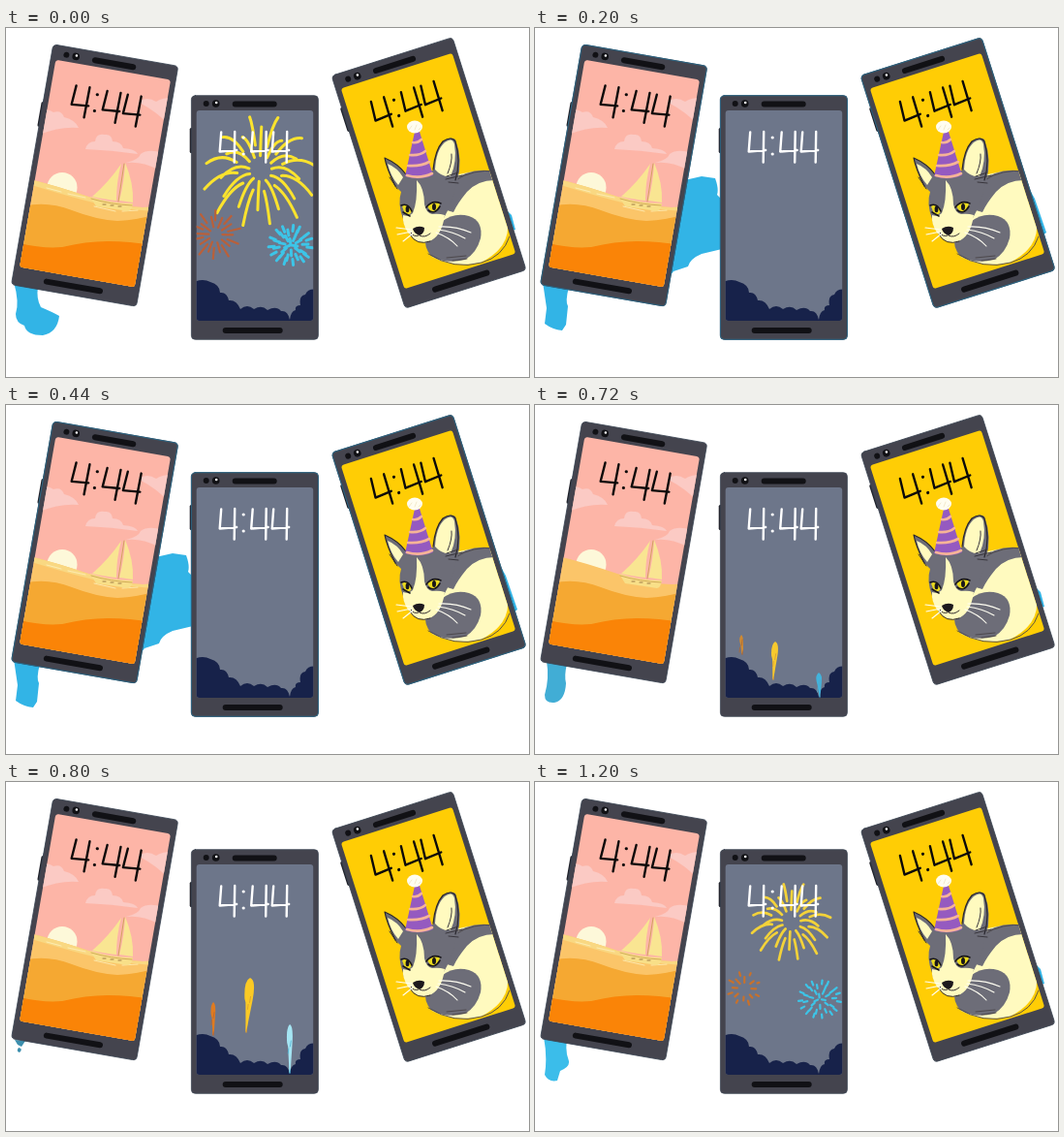
Write an HTML page that moves like this. It is 540 px wide and 360 px high and loops after 1400 ms.

```html
<!DOCTYPE html>
<html lang="en">
<head>
<meta charset="utf-8">
<title>Three lock screens</title>
<style>
html, body { margin: 0; width: 100%; height: 100%; overflow: hidden; background: #fff; }
svg { display: block; width: 100vw; height: 100vh; }
</style>
</head>
<body>
<svg id="stage" viewBox="0 0 540 360" stroke-linecap="round" stroke-linejoin="round"></svg>
<script>
const LOOP = 1400;
const STARTS = [0, 200, 600, 800, 1000, 1200];
const stage = document.getElementById('stage');

const fill = (color, d) => `<path fill="${color}" d="${d}"/>`;
const line = (color, width, d) => `<path fill="none" stroke="${color}" stroke-width="${width}" d="${d}"/>`;
const dot = (color, x, y, rx, ry = rx) => `<ellipse fill="${color}" cx="${x}" cy="${y}" rx="${rx}" ry="${ry}"/>`;
const noise = n => { const v = Math.sin(n * 127.1 + 3) * 43758.5; return v - Math.floor(v); };

// A group that shows only in the listed steps.
const during = (steps, art) => `<g data-steps="${steps}">${art}</g>`;

const four = x => `M${x + 1} 37.5L${x - 0.5} 57.5L${x + 17} 56M${x + 15} 37L${x + 14.5} 68.5`;

function phone(id, place, art, ink, buttonY) {
  return `
  <g transform="${place}">
    <rect x="-2" y="${buttonY}" width="5" height="26" rx="1.5" fill="#22232b"/>
    <rect x="-0.3" y="-0.3" width="131" height="251.6" rx="4" fill="#44444e" stroke="#3b4653" stroke-width="0.8"/>
    ${during('1', '<rect x="-0.3" y="-0.3" width="131" height="251.6" rx="4" fill="none" stroke="#2b6482"/>')}
    ${dot('#111115', 15, 8, 3)}${dot('#111115', 25, 8, 3.8)}${dot('#fff', 25.5, 7, 1.3)}
    ${line('#111115', 6, 'M45 8.5H85M35 242H91')}
  </g>
  <clipPath id="${id}"><rect transform="${place}" x="5" y="15" width="120.5" height="217" rx="3"/></clipPath>
  <g clip-path="url(#${id})">${art}</g>
  <g transform="${place}">
    ${line(ink, 2.4, four(29.5) + four(62) + four(83.5))}
    ${dot(ink, 53.5, 43, 1.6)}${dot(ink, 53.5, 60, 1.6)}
  </g>`;
}

// Curved rays that droop at the tips; every other ray sits further out.
function burst(cx, cy, count, inner, outer, color, width, sag) {
  let d = '';
  for (let i = 0; i < count; i++) {
    const a = (i + 0.3 * noise(i)) / count * Math.PI * 2;
    const far = i % 2;
    const from = inner * (far ? 2 : 1) + noise(i + 40) * 3;
    const to = outer * (far ? 1 : 0.74) - noise(i + 80) * outer * 0.08;
    const at = (r, drop) => `${(cx + Math.cos(a) * r).toFixed(1)} ${(cy + Math.sin(a) * r + drop).toFixed(1)}`;
    d += `M${at(from, 0)}Q${at((from + to) / 2, -sag * 0.6)} ${at(to, sag * Math.abs(Math.cos(a)))}`;
  }
  return line(color, width, d);
}

// Rings of loose dashes.
function sparkle(cx, cy, width, length) {
  let d = '';
  [[4, 3], [9, 7], [15, 11], [20, 15]].forEach(([r, count], ring) => {
    for (let i = 0; i < count; i++) {
      const a = (i + ring * 0.4 + noise(i + ring * 20) * 0.4) / count * Math.PI * 2;
      const x = cx + Math.cos(a) * r, y = cy + Math.sin(a) * r * 0.88;
      const dx = Math.cos(a) * length / 2, dy = Math.sin(a) * length / 2;
      d += `M${(x - dx).toFixed(1)} ${(y - dy).toFixed(1)}l${(dx * 2).toFixed(1)} ${(dy * 2).toFixed(1)}`;
    }
  });
  return line('#3cc5e8', width, d);
}

// A rocket head tapering into a rough tail.
function rocket(x, y, tailX, tailY, half, color, tail) {
  const midY = y + (tailY - y) * 0.4, midX = x + (tailX - x) * 0.4;
  return line(tail, 1.5, `M${midX} ${midY}L${tailX} ${tailY}`) +
    fill(color, `M${x} ${y}Q${x + half * 1.5} ${y + 2} ${midX + half} ${midY}L${tailX + 1} ${tailY - 5}L${tailX - 0.5} ${tailY}
      L${midX - half * 0.7} ${midY + 3}l-1 -4Q${x - half * 1.5} ${y + 3} ${x} ${y}Z`) +
    line(tail, 0.8, `M${midX + half * 0.5} ${midY - 3}l-1 6m-1.5 2l-.6 5`);
}

const seaside = `
  <rect width="190" height="300" fill="#fdb5a7"/>
  ${fill('#fbcac4', 'M30 84Q42 82 49 87Q57 84 60 92Q72 95 75 103Q57 101 34 110Z')}
  ${fill('#fbcac4', 'M82 125Q84 117 92 117Q93 108 102 110Q109 109 110 117Q119 117 121 124Q134 125 136 130Q109 126 82 125Z')}
  ${fill('#fbcac4', 'M136 76Q146 70 155 76Q163 71 176 72L168 100Q157 87 136 76Z')}
  ${fill('#fbcac4', 'M124 139Q137 136 139 130Q147 124 162 129L157 146Q140 137 124 139Z')}
  ${dot('#fdf8d9', 58, 164.5, 15.5)}
  ${fill('#fbc569', 'M20 155Q50 162 88 175T155 184L140 270H0Z')}
  ${during('0 1 3 4 5', fill('#f9d882', 'M20 155Q50 162 88 175T155 184V189Q118 187 90 180T20 160Z') +
    line('#fdf0bd', 0.8, 'M42 165l15 4m7 2l18 4m9 9l22 5m7 0l16 -1'))}
  ${fill('#f5a832', 'M18 184Q42 178 68 188T115 199Q136 198 155 192L140 270H0Z')}
  ${fill('#fa8407', 'M10 221Q37 228 58 226Q82 220 105 220T150 224L140 275H0Z')}
  ${fill('#f9e592', 'M119 140Q107 158 89 174Q104 177 114 178Q114 158 119 140ZM123 139Q132 160 131 180L117 178Q122 160 123 139Z')}
  ${fill('#f8df88', 'M87 174Q108 181 131 181Q130 188 126 189L93 184Z')}
  ${line('#c79b4c', 0.8, 'M122 140L116 179M88 176Q108 182 130 183')}
  ${line('#8b6336', 0.8, 'M100 182h3m5 1h3m5 1h3')}`;

const fireworks = `
  <rect x="190" y="80" width="135" height="230" fill="#6d768a"/>
  ${during('5', burst(264, 143, 24, 9, 42, '#f3d239', 2.7, 5) +
    burst(216, 213, 16, 6, 18, '#c8712b', 2.2, 0) + sparkle(294, 224, 2.2, 4))}
  ${during('0', burst(262, 145, 24, 11, 60, '#fbe32d', 3, 10) +
    burst(216, 213, 20, 6, 27, '#b9603a', 2.2, 0) + sparkle(294, 224, 3, 6))}
  ${fill('#17224a', `M190 264Q202 257 211 262Q221 265 221 273Q228 272 230 281Q238 280 242 290Q249 284 256 290
    Q264 285 270 291Q279 286 284 292Q291 291 293 301Q294 292 299 291Q298 286 304 286Q302 276 309 275Q312 268 322 270V310H190Z`)}
  ${during('2', rocket(213, 237, 214, 257, 1.5, '#cf8a32', '#a96737') +
    rocket(248, 244, 246, 283, 3, '#f7c92e', '#d79b35') + rocket(293, 276, 294, 301, 2.5, '#42b3dc', '#55a8c8'))}
  ${during('3', rocket(214, 227, 214, 261, 2, '#df7b20', '#b86632') +
    rocket(252, 202, 248, 258, 4.3, '#fbca25', '#d79b35') + rocket(293, 250, 293, 300, 2.6, '#a5e5f3', '#4dafd0'))}
  ${during('4', rocket(215, 212, 213, 249, 1.8, '#fb7d10', '#b65f31') +
    rocket(263, 154, 252, 235, 4, '#fbc526', '#d89d30') + rocket(293, 221, 293, 288, 3, '#e6fbfb', '#4fa9bf'))}`;

const cat = `
  <rect x="330" width="210" height="300" fill="#ffcd05"/>
  ${fill('#fffabf', 'M452 157Q478 145 500 149L516 192Q526 224 490 242Q463 248 440 236L430 215Z')}
  ${fill('#6d6d78', 'M458 160Q478 143 505 148L507 157Q488 156 476 169Q466 181 462 190L448 186Z')}
  ${fill('#6d6d78', 'M450 200Q462 190 478 194Q493 199 490 217Q486 232 474 239Q453 244 439 235Q431 226 434 217Z')}
  ${line('#4a4648', 0.9, 'M505 148Q483 145 464 157M436 233Q463 250 491 242Q513 236 520 215M455 237l20 -2m-14 5l15 -2')}
  ${fill('#6d6d78', 'M402 163Q393 145 391 134Q405 140 413 151L441 147Q443 126 451 117Q459 111 464 115Q472 136 466 157Q461 181 451 198Q442 215 427 217Q413 214 410 197Q404 181 408 169Z')}
  ${fill('#fffabf', 'M394 140Q404 144 410 154L405 162Q397 153 394 140ZM443 146Q444 126 453 118Q461 112 463 120Q466 138 459 153Q450 154 443 146Z')}
  ${line('#28262c', 1.2, 'M402 163Q393 145 391 134Q405 140 413 151M441 146Q443 126 451 117Q460 111 464 117Q470 137 464 157')}
  ${line('#38353c', 1, 'M455 153l12 -4m-13 7l17 -4m-14 7l10 1M404 166l-8 -12M456 150q5 -12 4 -20')}
  ${fill('#fffabf', 'M424 157Q432 165 432 182Q434 191 440 192Q447 191 453 193Q450 216 435 221Q423 223 415 211Q409 202 410 193Q416 195 420 191Q425 179 424 157Z')}
  ${fill('#e9d91d', 'M409 184Q415 180 419 188Q418 194 412 192ZM435 184Q441 178 448 181Q447 190 439 190Z')}
  ${line('#18161a', 1.6, 'M408 183Q415 180 419 189M434 185Q440 177 449 181M436 188Q443 193 448 184M410 190l7 4')}
  ${dot('#18161a', 414.5, 187, 1.9, 3.3)}${dot('#18161a', 442, 184.5, 2, 3.5)}
  ${fill('#1d191d', 'M420 207Q426 203 432 206Q432 212 427 214Q421 212 420 207Z')}
  ${line('#302a2e', 1, 'M427 214Q432 217 438 212M426 214Q421 216 418 211M417 213Q424 225 438 220')}
  ${line('#fffef2', 1.1, 'M419 208L403 206M419 210L404 213M420 212L410 220M447 205Q464 204 480 211M446 208Q462 210 474 217M444 211Q458 216 466 225')}
  ${fill('#955ac0', 'M422 107L412 153Q428 158 441 152L427 107Z')}
  ${line('#f6b497', 2.6, 'M420 118Q425 119 429 115M417 131Q427 132 433 127M415 142Q428 143 437 138M414 152Q428 156 440 150')}
  ${dot('#fffdf0', 422, 102, 8, 6.5)}
  ${line('#f2e9cb', 1, 'M416 105l3 -4m3 4l2 -5m2 5l2 -2')}`;

const blue = '#32b4e6';
const splashes = [
  during('0', fill(blue, 'M8 262L33 267Q31 279 36 288Q48 293 55 297Q53 314 38 317Q21 317 19 307Q10 304 10 295Q14 283 8 262Z')),
  during('1', fill(blue, 'M8 262L35 267Q31 282 34 287L32 306L28 312Q18 311 10 305L12 289Z') +
    fill(blue, 'M150 158L172 153L186 155Q190 166 188 172L193 177V228L172 233Q160 238 158 246L143 251L133 264Z') +
    fill(blue, 'M511 167L516 176L528 211L524 214Z')),
  during('2', fill('#41add5', 'M12 264L33 267Q30 279 32 287Q31 305 20 307Q10 308 10 299Q15 282 12 264Z')),
  during('3', fill('#3c8fae', 'M9 266L20 267L16 273L12 271ZM13 274q5 1 1 5q-4 -1 -1 -5Z')),
  during('4', fill('#6799ad', 'M9 266L20 267Q18 273 19 278L15 283L12 278Q14 273 9 266Z')),
  during('5', fill('#3bbdea', 'M9 263L33 267Q31 278 35 288Q36 294 26 298L23 308Q14 310 10 302Q13 284 9 263Z')),
  fill('#27607c', 'M44 47L49 46L43 79L38 78Z'),
  during('0 2 5', fill(blue, 'M518 189L522 193L526 208L522 209Z')),
].join('');

stage.innerHTML = splashes +
  phone('left', 'translate(49 17.2) rotate(9.9)', seaside, '#0b0909', 60) +
  phone('middle', 'translate(191.7 70)', fireworks, '#fff', 33) +
  phone('right', 'translate(336.5 49.5) rotate(-17.6)', cat, '#0b0909', 34);

const timed = [...stage.querySelectorAll('[data-steps]')]
  .map(node => ({ node, steps: node.dataset.steps.split(' ').map(Number) }));

function draw(now) {
  const time = now % LOOP;
  const step = STARTS.filter(start => start <= time).length - 1;
  for (const { node, steps } of timed) node.style.display = steps.includes(step) ? '' : 'none';
}

const origin = performance.now();
function tick() {
  draw(performance.now() - origin);
  requestAnimationFrame(tick);
}
tick();
</script>
</body>
</html>
```
